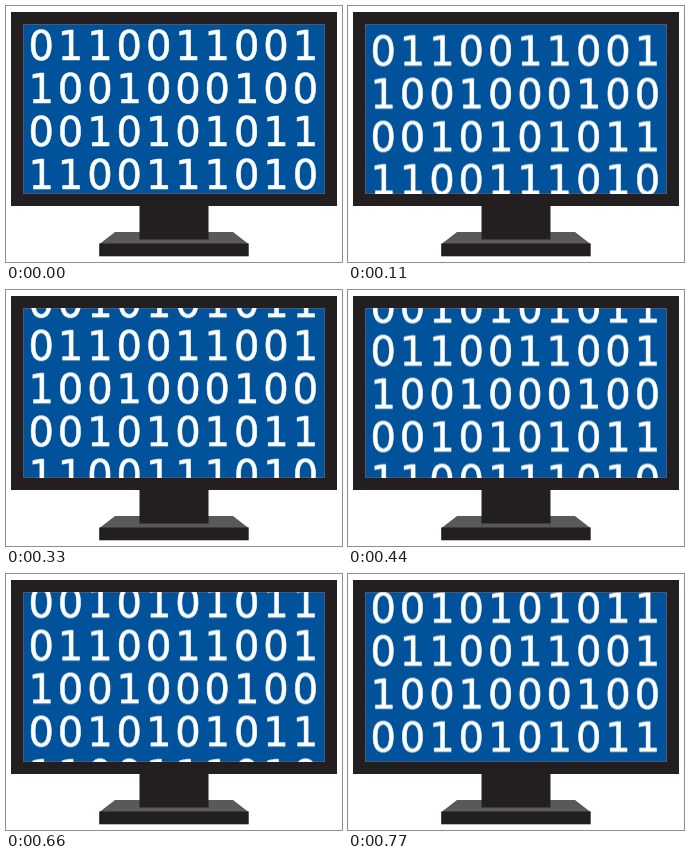
An HTML page that plays this animation: 336x256 px, repeating every 880 ms.

```html
<!DOCTYPE html>
<html lang="en">
<head>
<meta charset="utf-8">
<title>Binary monitor</title>
<style>
  html, body { margin: 0; width: 100%; height: 100%; overflow: hidden; background: #fff; }
  svg { display: block; width: 100%; height: 100%; }
  .case { fill: #231f20; }
  .digits {
    font: 40px "DejaVu Sans", sans-serif;
    letter-spacing: 3.9px;
    fill: #fff;
    stroke: #fff;
    stroke-width: .6;
    animation: scroll 880ms steps(8, end) infinite;
  }
  /* One row pitch per loop */
  @keyframes scroll {
    to { transform: translateY(43px); }
  }
</style>
</head>
<body>
<svg viewBox="0 0 336 256">
  <clipPath id="screen"><rect x="17" y="18" width="302" height="170"/></clipPath>

  <path fill="#58595b" d="M109 226H227L242.500 238H93.500Z"/>
  <rect class="case" x="93.200" y="237.500" width="149.500" height="12.800"/>
  <rect class="case" x="133.500" y="199" width="69" height="34.500"/>
  <rect class="case" x="5" y="6" width="326" height="194"/>
  <rect x="17.500" y="18.500" width="301" height="169" fill="#00539b" stroke="#46597f"/>

  <g clip-path="url(#screen)">
    <g class="digits">
      <text x="22.500" y="11">0010101011</text>
      <text x="22.500" y="54">0110011001</text>
      <text x="22.500" y="97">1001000100</text>
      <text x="22.500" y="140">0010101011</text>
      <text x="22.500" y="183">1100111010</text>
    </g>
  </g>
</svg>
</body>
</html>
```
